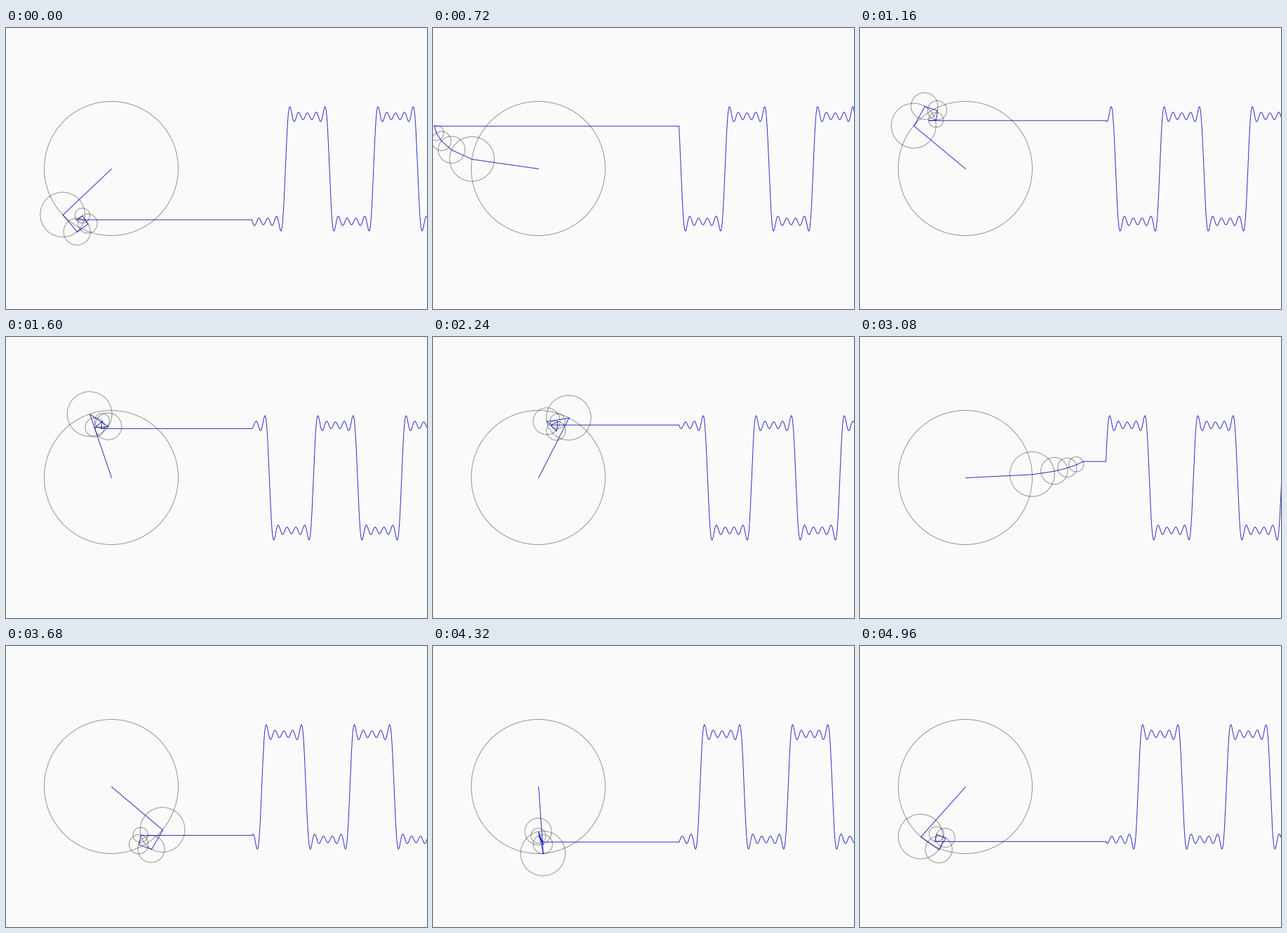
Write a matplotlib script that moves like this. It is 600x400 px and loops after 5 s.

```python
import numpy as np
import matplotlib.pyplot as plt
from matplotlib.animation import FuncAnimation
from matplotlib.patches import Circle

W, H, DPI = 600, 400, 100
FRAMES, INTERVAL = 125, 40
STEP = 0.05                      # radians per frame and per wave pixel
START = 14.95
CENTER = (150, 200)
WAVE_X = 350
HARMONICS = np.arange(1, 10, 2)
RADII = 75 * 4 / (HARMONICS * np.pi)
PIXEL = 72 / DPI
GREY = (0, 0, 0, 0.4)
BLUE = (0, 0, 0.74, 0.8)


def wave(t):
    return CENTER[1] + (RADII * np.sin(np.multiply.outer(t, HARMONICS))).sum(-1)


fig = plt.figure(figsize=(W / DPI, H / DPI), dpi=DPI, facecolor="#fafafa")
ax = fig.add_axes([0, 0, 1, 1])
ax.set_xlim(0, W)
ax.set_ylim(H, 0)
ax.axis("off")


def stroke(z):
    line, = ax.plot([], [], color=BLUE, lw=PIXEL, zorder=z, snap=False,
                    solid_capstyle="round", solid_joinstyle="round")
    return line


def trace(line, xs, ys):
    """Lines run through pixel centres, half a pixel from the grid."""
    line.set_data(np.asarray(xs) + 0.5, np.asarray(ys) + 0.5)


circles, arms = [], []
for i, r in enumerate(RADII):
    ring = Circle(CENTER, r, fill=False, ec=GREY, lw=PIXEL,
                  zorder=2 * i + 1, snap=False)
    circles.append(ax.add_patch(ring))
    arms.append(stroke(2 * i + 2))
link, curve = stroke(20), stroke(21)
wave_x = np.arange(WAVE_X, W + 3)


def draw(frame):
    t = START + STEP * frame
    x, y = CENTER
    for n, r, ring, arm in zip(HARMONICS, RADII, circles, arms):
        ring.center = x, y
        px, py = x, y
        x += r * np.cos(n * t)
        y += r * np.sin(n * t)
        trace(arm, [px, x], [py, y])
    trace(link, [x, WAVE_X], [y, y])
    trace(curve, wave_x, wave(t - STEP * (wave_x - WAVE_X)))
    return [*circles, *arms, link, curve]


anim = FuncAnimation(fig, draw, frames=FRAMES, interval=INTERVAL,
                     repeat=True, repeat_delay=0)
plt.show()
```
